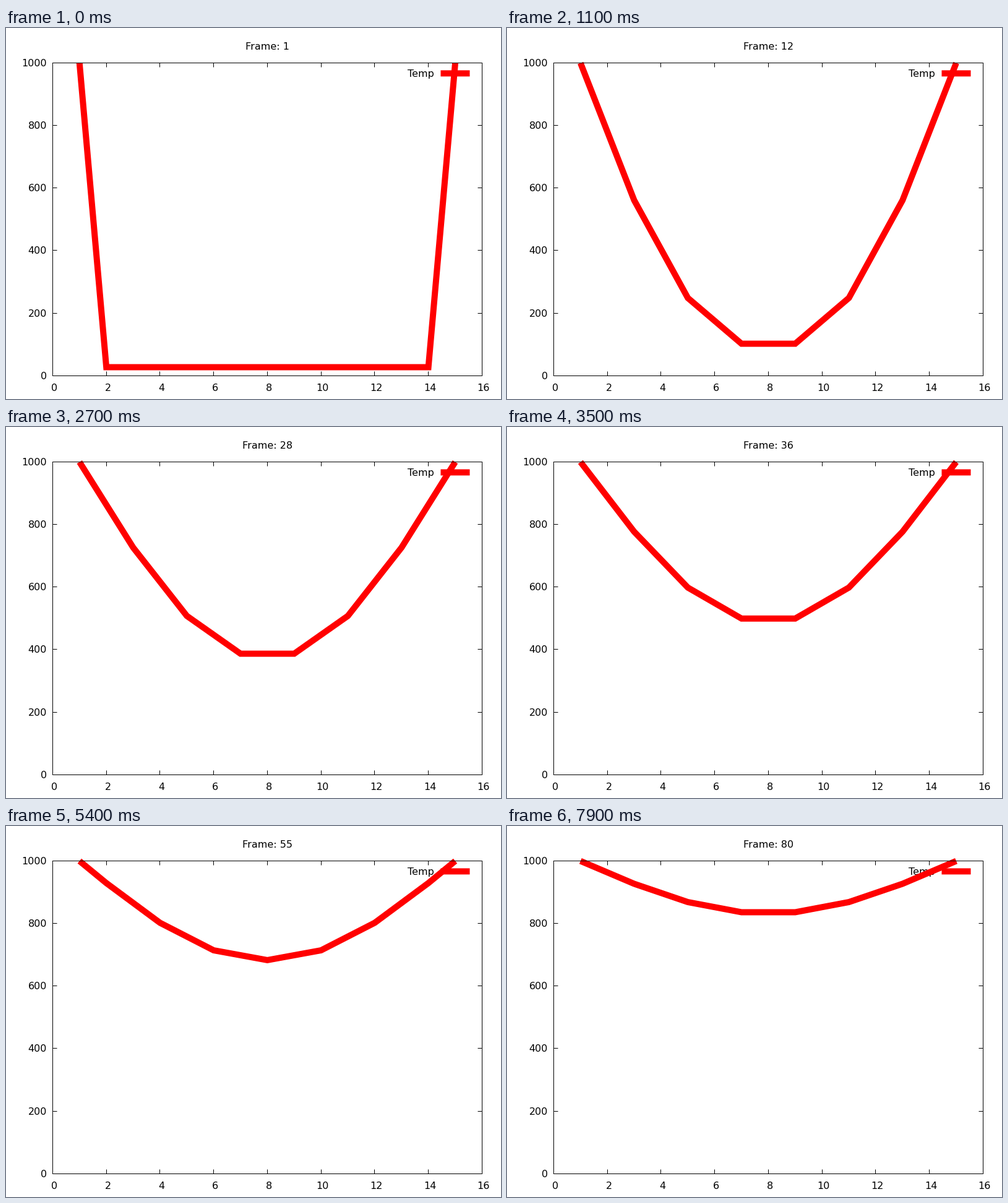
Write a matplotlib script that moves like this. It is 800x600 px and loops after 8000 ms.

```python
import matplotlib.pyplot as plt
import numpy as np
from matplotlib.animation import FuncAnimation

W, H, DPI = 800, 600, 100
PT = 72 / DPI  # points per pixel
LEFT, BOTTOM, XSPAN, YSPAN = 75.4, 562.2, 694, 505.6
FRAMES, INTERVAL = 80, 100
NODES, HOT, COLD = 15, 1000.0, 27.0

plt.rcParams["font.family"] = "DejaVu Sans"
fig = plt.figure(figsize=(W / DPI, H / DPI), dpi=DPI, facecolor="white")
ax = fig.add_axes([0, 0, 1, 1])
ax.set_xlim(0, W)
ax.set_ylim(H, 0)
ax.axis("off")


def px(x):
    return LEFT + XSPAN * x / 16


def py(y):
    return BOTTOM - YSPAN * y / 1000


def mid(v):
    """Centre of the pixel that holds v."""
    return np.floor(v) + 0.5


def stroke(xs, ys, color="black", width=1, z=4):
    line, = ax.plot(xs, ys, color=color, lw=width * PT, zorder=z,
                    solid_capstyle="butt", solid_joinstyle="miter",
                    clip_on=False, snap=False)
    return line


def label(x, y, text, ha="center"):
    return ax.text(x, y, text, ha=ha, va="baseline", fontsize=16 * PT,
                   color="black", zorder=1)


def heat_history():
    """Each inner node becomes the mean of its neighbours at every step."""
    temp = np.full(NODES, COLD)
    temp[[0, -1]] = HOT
    rows = [temp]
    for _ in range(FRAMES - 1):
        temp = temp.copy()
        temp[1:-1] = (rows[-1][:-2] + rows[-1][2:]) / 2
        rows.append(temp)
    return np.array(rows)


x0, x1 = mid(px(0)), mid(px(16))
y0, y1 = mid(py(0)), mid(py(1000))
for y in (y0, y1):
    stroke([x0 - 0.5, x1 + 0.5], [y, y])
for x in (x0, x1):
    stroke([x, x], [y0, y1])

for v in range(0, 17, 2):
    x = mid(px(v))
    stroke([x, x], [y0, y0 - 7])
    stroke([x, x], [y1, y1 + 7])
    label(px(v) + 2.5, 587, str(v))
for v in range(0, 1001, 200):
    y = mid(py(v))
    stroke([x0, x0 + 7], [y, y])
    stroke([x1, x1 - 7], [y, y])
    label(66, np.floor(py(v)) + 6, str(v), "right")

label(692, 79, "Temp", "right")
stroke([702.5, 749.5], [73.4, 73.4], "red", 10, 2)

history = heat_history()
title = label(422.5, 35, "")
curve = stroke(px(np.arange(1, NODES + 1)), py(history[0]), "red", 10, 3)


def update(i):
    title.set_text(f"Frame: {i + 1}")
    curve.set_ydata(py(history[i]))
    return title, curve


anim = FuncAnimation(fig, update, frames=FRAMES, interval=INTERVAL,
                     repeat=True, repeat_delay=0, blit=False)
plt.show()
```
